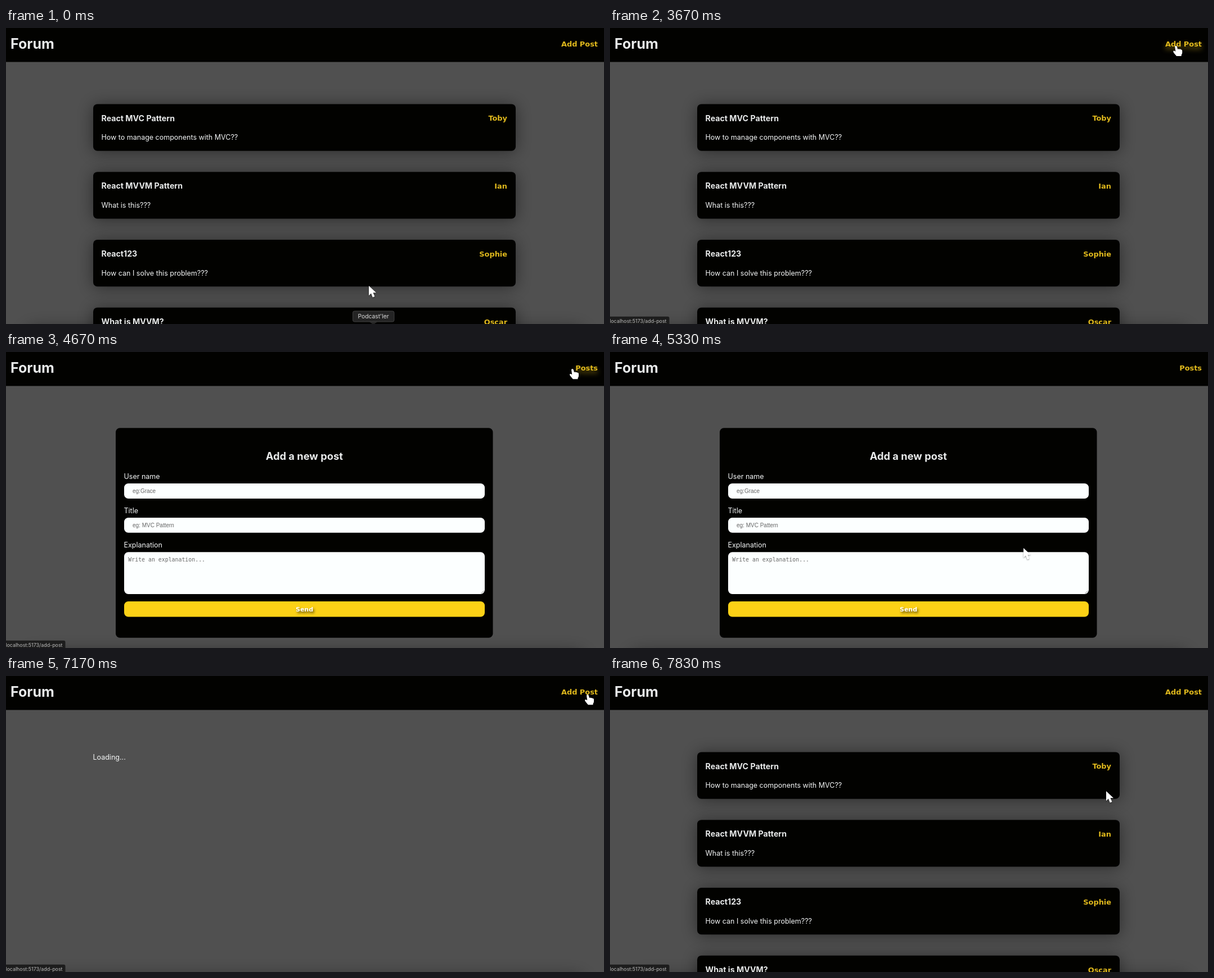
Animation of 1063 by 527 pixels, one loop 8000 ms. Source, as an HTML page:

```html
<!DOCTYPE html>
<html lang="en">
<head>
<meta charset="utf-8">
<title>Forum</title>
<style>
  html, body { margin: 0; width: 100%; height: 100%; overflow: hidden; background: #505050; }
  svg { display: block; width: 100vw; height: 100vh; }
  text { font-family: Inter, "Open Sans", sans-serif; font-size: 12.5px; fill: #f4f6f6; white-space: pre; }
  .brand { font-size: 25px; font-weight: 700; fill: #e8eaea; }
  .title { font-size: 14.2px; font-weight: 700; fill: #e8eaea; }
  .heading { font-size: 18.3px; font-weight: 700; fill: #e8eaea; }
  .wide { font-family: "DejaVu Sans", sans-serif; font-size: 12.9px; font-weight: 700; fill: #e0b91c; }
  .send { font-size: 11px; fill: #fff; filter: drop-shadow(2px 3px 2px rgba(0,0,0,.7)); }
  .hint { font-family: "Liberation Sans", Arial, sans-serif; font-size: 10px; fill: #666; }
  .mono { font-family: "DejaVu Sans Mono", monospace; font-size: 9.9px; fill: #666; }
  .tip { font-size: 10.3px; fill: #dcdcdc; }
  .url { font-size: 8.9px; fill: #bababa; }
  .end { text-anchor: end; }
  .mid { text-anchor: middle; }
  .glow { filter: drop-shadow(0 5px 5px rgba(226,189,28,.6)); }
  .pointer { fill: #fff; filter: drop-shadow(0 1px 1.2px rgba(0,0,0,.45)); }
</style>
</head>
<body>
<svg viewBox="0 0 1063 527" preserveAspectRatio="none">
  <defs>
    <filter id="soft" x="-20%" y="-80%" width="140%" height="260%">
      <feGaussianBlur stdDeviation="14"/>
    </filter>
  </defs>
  <rect width="1063" height="527" fill="#505050"/>
  <rect x="34" y="533" width="995" height="90" rx="20" opacity=".4" filter="url(#soft)"/>

  <g id="posts"></g>

  <g id="form">
    <rect x="195" y="135.3" width="670.5" height="373.4" rx="7.5" fill="#020200"/>
    <text class="heading mid" x="530.3" y="192">Add a new post</text>
    <g id="fields"></g>
    <path d="M844.5 430l5-5M847.5 430l2-2" stroke="#777" stroke-width=".8"/>
    <rect x="210" y="444" width="641" height="27.5" rx="7.5" fill="#fcd116"/>
    <text class="wide send mid" x="530.5" y="461.6">Send</text>
  </g>

  <text id="loading" x="154.5" y="148.5">Loading...</text>

  <rect width="1063" height="60.5" fill="#020200"/>
  <text class="brand" x="8" y="36.8">Forum</text>
  <text id="link" class="wide end" x="1052" y="33"></text>

  <g id="tooltip">
    <path d="M646 523h14l-5 4h-4z" fill="#242424"/>
    <rect x="616.5" y="504" width="73.5" height="19" rx="3" fill="#242424" stroke="#4a4a4a" stroke-width=".8"/>
    <text class="tip mid" x="653" y="517.2">Podcast'ler</text>
  </g>

  <g id="status">
    <path d="M0 513.7H102.5Q105.5 513.7 105.5 516.7V527H0z" fill="#1d1d1d"/>
    <text class="url end" x="100.5" y="524.7">localhost:5173/add-post</text>
  </g>

  <g id="cursor">
    <g id="ring" fill="none" stroke="#a8a8a8">
      <circle cx="-5" cy="-2.3" r="34.6" stroke-width=".9"/>
      <circle cx="-5" cy="-2.3" r="32.8" stroke-width=".7" opacity=".75"/>
    </g>
    <path id="arrow" class="pointer" d="M0 0V17.3L4 13.6L6.8 20.5L10.4 19L7.5 12.2H13Z"/>
    <path id="hand" class="pointer" d="M-2 1.8Q-1.9 0 -.2 0Q1.3 0 1.8 1.7L3 6.2Q4.6 5 6 6.2Q7.8 5.4 8.8 6.9Q10.9 6.6 11 9V12.5Q10.8 15 9.5 16V18.2H.8L-3.8 12.8Q-5.8 9.8 -4.4 9Q-3 8.5 -.8 10.3Z"/>
  </g>
</svg>
<script>
const LOOP = 8000, FPS = 6;
const $ = id => document.getElementById(id);

const label = (x, y, s, cls = "") => `<text class="${cls}" x="${x}" y="${y}">${s}</text>`;
const box = (x, y, w, h, attrs) => `<rect x="${x}" y="${y}" width="${w}" height="${h}" rx="7.5" ${attrs}/>`;

const posts = [
  ["React MVC Pattern", "Toby", "How to manage components with MVC??"],
  ["React MVVM Pattern", "Ian", "What is this???"],
  ["React123", "Sophie", "How can I solve this problem???"],
  ["What is MVVM?", "Oscar", ""]
];
$("posts").innerHTML = posts.map(([title, author, body], i) => {
  const y = 135.4 + i * 120.75;
  return box(155, y + 2, 751, 83.3, 'opacity=".45" filter="url(#soft)"') +
    box(155, y, 751, 83.3, 'fill="#020200"') +
    label(169.5, y + 30.2, title, "title") +
    label(891, y + 30, author, "wide end") +
    label(169.5, y + 63.9, body);
}).join("");

const fields = [
  ["User name", 234, 27, 225, 250.8, "eg:Grace", "hint"],
  ["Title", 295, 26.7, 225, 311.8, "eg: MVC Pattern", "hint"],
  ["Explanation", 356.3, 74.7, 217.3, 373.2, "Write an explanation...", "mono"]
];
$("fields").innerHTML = fields.map(([name, y, h, tx, ty, hint, cls]) =>
  label(209.5, y - 8.5, name) + box(210, y, 641, h, 'fill="#fcffff"') + label(tx, ty, hint, cls)
).join("");

// Pointer path: tick, x, y
const path = [
  [0, 645, 459], [1, 652, 452], [14, 652, 452], [15, 807, 320],
  [19, 978, 78], [21, 1006, 32], [27, 1007, 30], [28, 1007, 30],
  [30, 905, 165], [32, 735, 349], [34, 735, 349], [38, 748, 330],
  [39, 748, 330], [42, 1034, 33], [46, 1034, 33], [47, 882, 205]
];

function pointerAt(tick) {
  const i = path.findIndex(p => p[0] >= tick);
  if (i < 0) return path[path.length - 1].slice(1);
  if (i === 0) return path[0].slice(1);
  const [t0, x0, y0] = path[i - 1], [t1, x1, y1] = path[i];
  const k = (tick - t0) / (t1 - t0);
  return [x0 + (x1 - x0) * k, y0 + (y1 - y0) * k];
}

const within = (n, a, b) => n >= a && n <= b;
const show = (id, on) => $(id).setAttribute("display", on ? "inline" : "none");

function render(ms) {
  const tick = Math.min(47, Math.floor((ms + 5) * FPS / 1000));
  const onForm = within(tick, 28, 42), loading = tick === 43;
  const hand = within(tick, 21, 28) || within(tick, 42, 46);

  show("form", onForm);
  show("loading", loading);
  show("posts", !onForm && !loading);
  show("tooltip", tick === 0);
  show("status", within(tick, 22, 29) || tick >= 43);
  show("ring", tick === 27 || tick === 42);
  show("hand", hand);
  show("arrow", !hand);

  $("link").textContent = onForm ? "Posts" : "Add Post";
  $("link").classList.toggle("glow", hand && !loading);
  const [x, y] = pointerAt(tick);
  $("cursor").setAttribute("transform", `translate(${x.toFixed(1)} ${y.toFixed(1)})`);
}

const start = performance.now();
function loop() {
  render((performance.now() - start) % LOOP);
  requestAnimationFrame(loop);
}
render(0);
requestAnimationFrame(loop);
</script>
</body>
</html>
```
